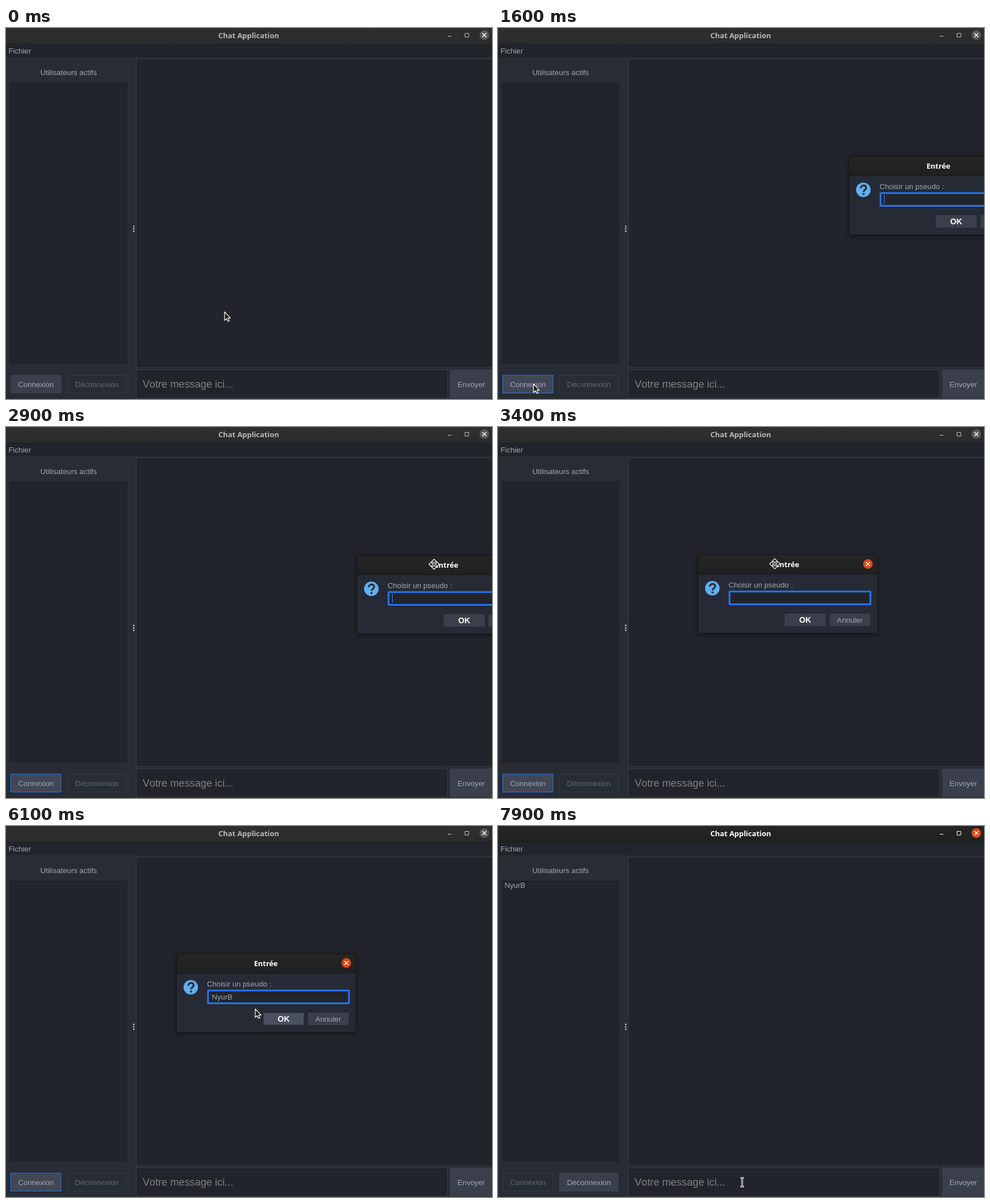
Recreate the animation shown at these times as an HTML page. Size 856x654 px, loop 8 s.

```html
<!DOCTYPE html>
<html lang="fr">
<head>
<meta charset="utf-8">
<title>Chat Application</title>
<style>
  html, body { margin: 0; width: 100%; height: 100%; overflow: hidden; background: #282c34; }
  svg { display: block; width: 856px; height: 654px; }
  text { font: 13.2px "Liberation Sans", Arial, sans-serif; font-kerning: none; fill: #a0a7b4; white-space: pre; }
  .title { font: bold 12.9px "Noto Sans", sans-serif; fill: #fff; text-anchor: middle; }
  .mid { text-anchor: middle; }
  .edge { fill: none; stroke: #363b45; }
  .pane { fill: #21252b; }
  .btn { fill: #3a3f4b; }
  .cross { stroke: #fff; stroke-width: 1.5; }
  .cursor { fill: #1d1d1f; stroke: #fff; stroke-width: 1.2; stroke-linejoin: round; }
</style>
</head>
<body>
<svg viewBox="0 0 856 654" xmlns="http://www.w3.org/2000/svg">
  <defs>
    <linearGradient id="idleBar" x2="0" y2="1"><stop stop-color="#2f2f2f"/><stop offset="1" stop-color="#2b2b2b"/></linearGradient>
    <linearGradient id="liveBar" x2="0" y2="1"><stop stop-color="#262626"/><stop offset="1" stop-color="#202020"/></linearGradient>
    <filter id="shadow" x="-10%" y="-20%" width="120%" height="140%">
      <feDropShadow dx="0" dy="2" stdDeviation="5" flood-color="#000" flood-opacity=".5"/>
    </filter>
  </defs>

  <rect width="856" height="654" fill="#282c34"/>
  <rect id="bar" width="856" height="28"/>
  <rect y="28" width="856" height="1" fill="#1c1d20"/>
  <text id="caption" class="title" x="427.5" y="17.7">Chat Application</text>
  <path id="controls" fill="none" d="M778 14.5h6.5M808.5 9.5h6.5v6.5h-6.5z"/>
  <circle id="close" cx="842.5" cy="12.5" r="8.4"/>
  <path class="cross" d="M839 9l7 7m0-7l-7 7"/>

  <rect class="pane" y="29" width="856" height="22.5"/>
  <text x="4.5" y="45">Fichier</text>
  <text class="mid" x="110.3" y="83">Utilisateurs actifs</text>
  <rect class="pane" x="6" y="96" width="208" height="496"/>
  <text id="member" x="11.5" y="109"></text>
  <path d="M225 349.7v0M225 354v0M225 358.3v0" stroke="#b4bac5" stroke-width="3" stroke-linecap="round"/>

  <rect class="pane" x="229" y="54" width="627" height="545"/>
  <path class="edge" d="M856 54.5H229.5V598.5H856"/>
  <rect class="pane" x="229" y="602" width="549" height="51"/>
  <rect class="edge" x="229.5" y="602.5" width="548" height="50"/>
  <text x="240.7" y="634" style="font-size:18.2px;fill:#808080">Votre message ici...</text>
  <rect class="btn" x="782" y="602" width="74" height="51"/>
  <text class="mid" x="819.5" y="632.5">Envoyer</text>

  <rect id="ring" x="7" y="610.8" width="91.5" height="34" rx="1" fill="none" stroke="#2675f5" stroke-width="2"/>
  <rect id="join" x="8.5" y="612" width="88.5" height="31.5"/>
  <text id="joinText" class="mid" x="52.7" y="632.5">Connexion</text>
  <rect id="leave" x="108.5" y="612" width="103" height="31.5"/>
  <text id="leaveText" class="mid" x="160" y="632.5">Déconnexion</text>

  <g id="dialog">
    <path d="M300 364V232q0-7 7-7H609.5q7 0 7 7V364z" fill="#282c34" filter="url(#shadow)"/>
    <path d="M300 259V232q0-7 7-7H609.5q7 0 7 7V259z" fill="url(#liveBar)"/>
    <path d="M300.5 363.5V232q0-6.500 6.500-6.500H609.5q6.500 0 6.500 6.500V363.5zM300 259.5H616" fill="none" stroke="#17181b"/>
    <text class="title" x="457.7" y="246.7">Entrée</text>
    <circle cx="599.5" cy="241.5" r="8.4" fill="#df4716"/>
    <path class="cross" d="M596 238l7 7m0-7l-7 7"/>
    <circle cx="325.5" cy="284.3" r="12.8" fill="#61afef"/>
    <path d="M321 281.5c0-6.5 9.5-6.5 9.5-.7c0 3.7-4.7 3.5-4.7 7.2" fill="none" stroke="#282c34" stroke-width="3.2"/>
    <rect x="324.1" y="290" width="3.4" height="3.4" fill="#282c34"/>
    <text x="354" y="282.5">Choisir un pseudo :</text>
    <rect class="pane" x="355.8" y="290" width="248.2" height="22.5" rx="1" stroke="#2675f5" stroke-width="3"/>
    <text id="entry" x="362.5" y="305.5"></text>
    <rect id="caret" y="293" width="1" height="16"/>
    <rect id="ok" x="453.5" y="329.5" width="71" height="21"/>
    <text class="mid" x="489" y="345" style="font-weight:bold;font-size:14px;fill:#fff">OK</text>
    <rect class="btn" x="532" y="329" width="71.5" height="22"/>
    <text class="mid" x="567.6" y="345">Annuler</text>
  </g>

  <path id="arrow" class="cursor" d="M.5 .5V15.5L4 12.3L6.3 17.3L8.8 16.2L6.5 11.3H10.8Z"/>
  <g id="move" class="cursor">
    <path d="M0-9L9 0L0 9L-9 0Z"/>
    <path d="M-4-4h3v3h-3zM1-4h3v3h-3zM-4 1h3v3h-3zM1 1h3v3h-3z" stroke-width="1"/>
  </g>
  <g id="beam" fill="none">
    <path d="M-3-7.5H3M-3 7.5H3M0-7.5V7.5" stroke="#fff" stroke-width="2.8"/>
    <path d="M-2.5-7.5H2.5M-2.5 7.5H2.5M0-7.5V7.5" stroke="#222" stroke-width=".9"/>
  </g>
</svg>
<script>
const LOOP = 8000, STEP = 100, NAME = "NyurB";
const CLICK = 1200, OPEN = 1600, GRAB = 3000, DROP = 3700, ACCEPT = 6100, JOINED = 6300, REFOCUS = 7900;
const KEYS = [4400, 4600, 4800, 5000, 5300];
const HOME = { x: 436, y: 241 };   // where the pointer lets go of the dialog

const el = {};
document.querySelectorAll("[id]").forEach(e => el[e.id] = e);

// Each move eases the pointer to a point; bow bends it sideways.
const rest = { x: 384.5, y: 500 };
const moves = [
  { from: 0, to: 1000, x: 107, y: 618 },
  { from: 1000, to: CLICK, x: 62, y: 627 },
  { from: OPEN, to: 2000, x: 700.5, y: 296 },
  { from: 2100, to: 2600, x: 775, y: 172 },
  { from: 2600, to: 2900, x: 754, y: 242 },
  { from: GRAB, to: 3537, ...HOME },
  { from: 3800, to: 4000, x: 438.5, y: 322 },
  { from: 6900, to: 7800, x: 430, y: 628, bow: 16 }
];

function pointerAt(t) {
  let { x, y } = rest;
  for (const m of moves) {
    const f = Math.min(1, Math.max(0, (t - m.from) / (m.to - m.from)));
    const e = f * f * (3 - 2 * f);
    x += (m.x - x) * e + (m.bow || 0) * Math.sin(Math.PI * f);
    y += (m.y - y) * e;
  }
  return { x, y };
}

function show(e, on) { e.style.display = on ? "" : "none"; }
function paint(e, fill, stroke) { e.style.fill = fill; e.style.stroke = stroke || "none"; }
function place(e, x, y) { e.setAttribute("transform", `translate(${x} ${y})`); }

function button(box, label, on, hot) {
  if (hot) paint(box, "#414754", "#2675f5");
  else if (on) paint(box, "#3a3f4b", "#3e434f");
  else paint(box, "#282c34", "#363b45");
  label.style.fill = on ? "#a0a7b4" : "#626975";
}

function drawWindow(t) {
  const clicked = t >= CLICK && t < OPEN, active = clicked || t >= REFOCUS;
  const joined = t >= JOINED;
  paint(el.bar, active ? "url(#liveBar)" : "url(#idleBar)");
  el.caption.style.fill = active ? "#fff" : "#b9b9b9";
  el.controls.style.stroke = active ? "#fff" : "#c8c8c8";
  el.close.style.fill = active ? "#df4716" : "#585858";
  show(el.ring, clicked);
  button(el.join, el.joinText, !joined, t > 1000 && !joined);
  button(el.leave, el.leaveText, joined, false);
  el.member.textContent = joined ? NAME : "";
}

function drawDialog(t) {
  show(el.dialog, t >= OPEN && t <= ACCEPT);
  const grip = pointerAt(Math.min(DROP, Math.max(GRAB, t)));
  place(el.dialog, Math.round(grip.x - HOME.x), Math.round(grip.y - HOME.y));

  const typed = KEYS.filter(k => k <= t).length;
  el.entry.textContent = NAME.slice(0, typed);
  const blink = Math.floor((t - 1200) / 500) % 2 === 1 || t < 1700;
  show(el.caret, typed ? t < 5900 : blink);
  el.caret.setAttribute("x", Math.floor(362.5 + (typed && el.entry.getComputedTextLength())));
  el.caret.style.fill = typed ? "#a0a7b4" : "#568af2";
  if (t >= ACCEPT) paint(el.ok, "#4a505e", "#343944");
  else paint(el.ok, "#3a3f4b", "#3a3f4b");
}

function drawPointer(t) {
  const { x, y } = pointerAt(t);
  const shape = t >= 2900 && t < DROP ? el.move : t > ACCEPT && y > 602 ? el.beam : el.arrow;
  for (const e of [el.arrow, el.move, el.beam]) show(e, e === shape);
  place(shape, x, y);
}

function render(t) {
  drawWindow(t);
  drawDialog(t);
  drawPointer(t);
}

const start = performance.now();
function tick(now) {
  const t = Math.max(0, now - start) % LOOP;
  render(Math.floor(t / STEP) * STEP);
  requestAnimationFrame(tick);
}
render(0);
requestAnimationFrame(tick);
</script>
</body>
</html>
```
